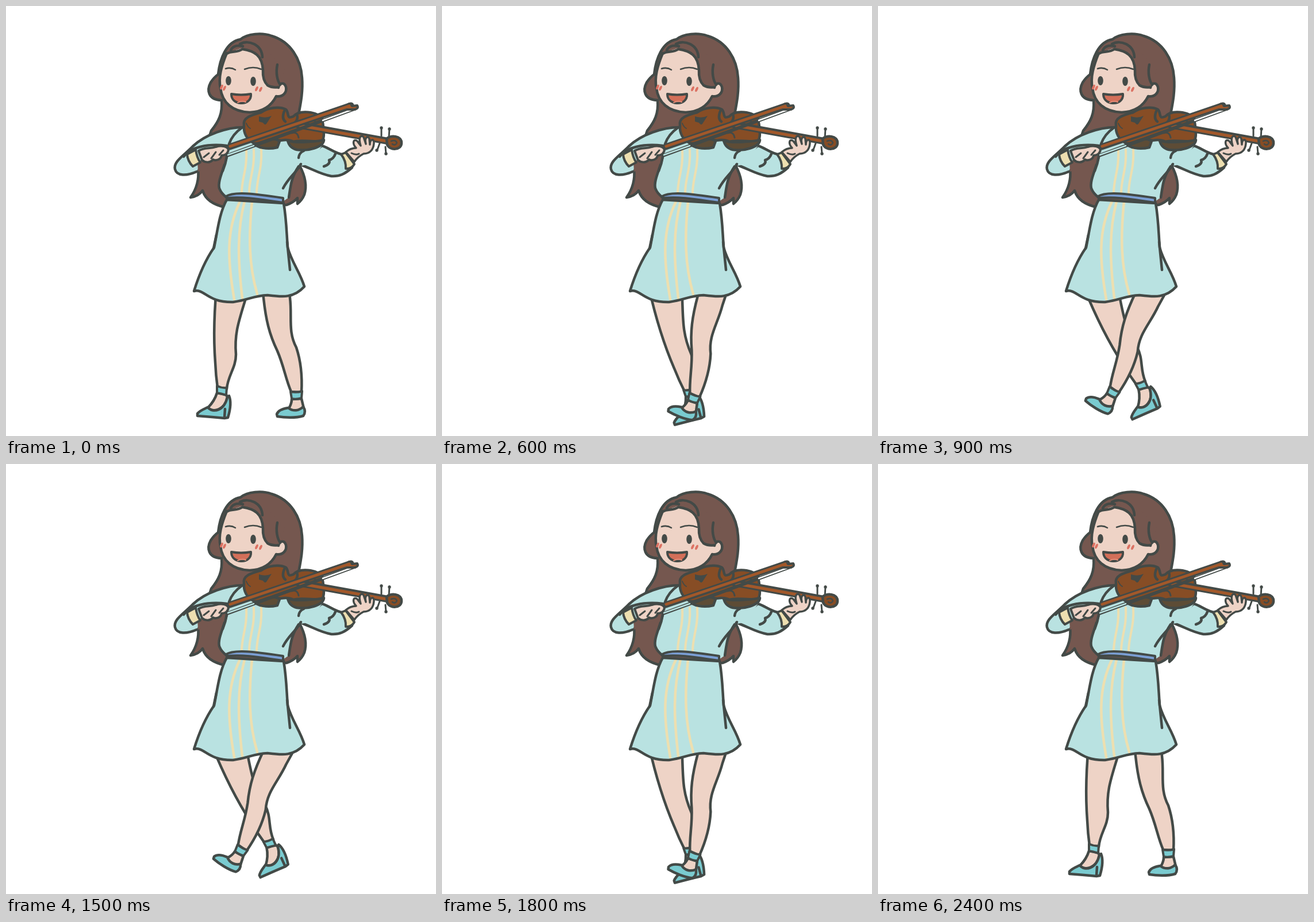
Recreate the animation shown at these times as an HTML page with a canvas. Size 748 by 748 pixels, loop 2.7 s.

```html
<!DOCTYPE html>
<html lang="en">
<head>
<meta charset="utf-8">
<title>Violinist</title>
<style>
html, body { margin: 0; width: 100%; height: 100%; overflow: hidden; background: #fff; }
canvas { display: block; width: 748px; height: 748px; }
</style>
</head>
<body>
<canvas id="stage" width="748" height="748"></canvas>
<script>
const ctx = document.getElementById('stage').getContext('2d');
const INK = '#434a47', HAIR = '#75574f', SKIN = '#eed3c6', DRESS = '#b9e2e1',
  CREAM = '#eddfb0', BELT = '#7b9fd4', TEAL = '#7acbd0', WOOD = '#874d25',
  BOW = '#a2582a', SHADE = '#5d4c36', MOUTH = '#d36f59', BLUSH = '#dc7263';

const STEP = 300, LOOP = 2700;
const ANKLES = {
  left: [[376, 668], [401, 677], [431, 672], [459, 659], [487, 645]],
  right: [[504, 676], [473, 688], [437, 681], [408, 671], [379, 652]]
};

ctx.lineCap = ctx.lineJoin = 'round';

function fill(d, color) {
  ctx.fillStyle = color;
  ctx.fill(new Path2D(d));
}

function line(d, width = 4.5, color = INK) {
  ctx.lineWidth = width;
  ctx.strokeStyle = color;
  ctx.stroke(new Path2D(d));
}

function shape(d, color, width) {
  fill(d, color);
  line(d, width);
}

function dot(x, y, rx, ry, color = INK, tilt = 0) {
  ctx.fillStyle = color;
  ctx.beginPath();
  ctx.ellipse(x, y, rx, ry, tilt, 0, Math.PI * 2);
  ctx.fill();
}

// Legs are drawn around the ankle and swing as one piece.
function limb([x, y], degrees, draw) {
  ctx.save();
  ctx.translate(x, y);
  ctx.rotate(degrees * Math.PI / 180);
  draw();
  ctx.restore();
}

function leftLeg() {
  shape('M-8-195C-13-150-16-100-12-48Q-11-25-8-4L8-2C10-26 24-38 24-62C21-98 29-120 40-156L52-195', SKIN);
  shape('M-9 5C-12 15-18 24-25 31C-14 40 4 34 10 14L7 8Z', SKIN);
  shape('M-43 41C-38 35-31 33-25 30C-16 41 4 36 9 12L12 10C17 22 13 38 10 48L4 49Q-16 47-43 45Z', TEAL);
  line('M4 48L5 33');
  shape('M-9-7Q0-3 8-4L7 9Q-2 6-9 5Z', TEAL, 4);
}

function rightLeg() {
  shape('M-59-190L-56-168C-52-130-46-105-32-76C-20-48-18-28-8-5L10-4C12-40 7-64 1-82C-14-110-6-135-10-168L-11-190', SKIN);
  shape('M-7 8C-7 16-10 20-12 24C-5 32 10 32 14 24L10 7Z', SKIN);
  shape('M-33 34C-30 26-20 24-13 23C-4 30 6 28 13 21C17 27 17 32 13 37C0 41-20 40-32 38Z', TEAL);
  shape('M-9-5Q2-3 11-6L10 6Q0 9-7 7Z', TEAL, 4);
}

function backHair() {
  shape('M408 58C420 48 445 46 462 52C495 62 513 92 515 125C517 150 512 172 509 188' +
    'L511 278C520 295 524 312 519 328Q515 338 507 344L507 334Q500 342 488 346L380 350' +
    'C360 345 347 337 342 321Q335 331 321 333C332 318 336 300 334 285L357 217' +
    'C370 201 377 187 375 164C351 163 349 146 356 133Q362 124 369 119C372 92 383 62 408 58Z', HAIR);
}

function torso() {
  fill('M412 211L388 240L384 265C377 288 368 304 372 318L383 332L482 340L492 333C495 310 500 292 512 276L545 240L500 225Z', DRESS);
  for (const x of [418, 431, 444])
    line(`M${x} 250C${x + 2} 283 ${x - 8} 300 ${x - 8} 325`, 4, CREAM);
  line('M384 262C378 287 368 304 371 317Q375 327 383 332');
  line('M492 333C495 314 496 298 509 279');
  shape('M549 243C562 246 571 257 589 259L602 281C590 292 580 297 566 296C547 293 530 282 512 276Z', DRESS);
  fill('M500 245L550 242L530 275L512 278Z', DRESS);
  line('M513 275C504 291 492 298 482 317');
  line('M518 252Q510 255 509 264');
  line('M553 279Q565 275 562 268Q570 266 573 257');
  shape('M583 258L591 255L606 275Q601 284 591 283Q592 270 583 258Z', CREAM, 4);
}

function skirt() {
  const d = 'M384 337C371 360 368 391 362 420C346 443 335 470 327 496C345 491 350 516 395 515' +
    'C423 511 430 504 455 503C480 506 500 509 519 488C512 464 497 446 490 420C488 395 488 372 483 343Z';
  fill(d, DRESS);
  line('M407 340C383 390 385 440 397 510', 4.5, CREAM);
  line('M415 340C402 390 403 440 411 508', 4.5, CREAM);
  line('M428 340C422 400 422 450 437 501', 4.5, CREAM);
  line(d);
  line('M366 398L361 422');
  line('M489 410L494 459');
  shape('M382 332C395 322 430 326 482 334L482 342C450 338 420 331 384 334Z', BELT, 4);
}

function face() {
  fill('M384 82C375 104 369 124 373 143C376 168 394 184 424 185C449 184 463 171 470 158C482 159 489 150 487 141C484 131 475 134 474 141L455 137L445 90L411 73Z', SKIN);
  line('M384 82C375 104 369 124 373 143C376 168 394 184 424 185C449 184 463 171 470 157C482 159 489 150 487 141C484 131 475 134 474 142');
  fill('M411 75C432 78 445 90 447 112Q446 129 455 138Q464 143 474 141L485 110L440 62Z', HAIR);
  line('M384 83C392 77 402 82 411 75C432 78 446 86 447 112Q446 129 455 138Q464 143 474 141');
  line('M472 102C469 117 472 130 477 137');
  line('M391 77C395 68 406 68 412 70');
  line('M407 66C422 58 445 67 446 89');
  line('M382 109Q391 106 399 111', 2.5);
  line('M415 110Q430 104 444 110', 2.5);
  dot(387, 130, 4.8, 8);
  dot(430, 131, 4.8, 8);
  for (const [x, y] of [[375, 141], [380, 143], [436, 144], [443, 145]])
    dot(x, y, 2.1, 4.6, BLUSH, .45);
  shape('M392 153Q409 156 426 153C427 164 418 170 408 169C398 168 392 162 392 153Z', MOUTH, 4);
  line('M403 168Q410 164 417 167', 2, '#e58c77');
}

function violin() {
  shape('M430 238C445 229 466 228 476 235L472 246C455 250 436 247 430 238Z', SHADE);
  shape('M490 234C510 240 535 235 553 233C552 246 524 253 506 250Q493 247 490 234Z', SHADE);
  shape('M414 208C411 193 430 189 444 185C455 177 475 174 487 180C493 186 487 198 500 192' +
    'C510 180 541 183 550 196C552 210 555 224 551 233C536 239 515 231 500 236' +
    'C486 229 476 237 470 232C455 229 446 240 432 239C418 232 413 220 414 208Z', WOOD);
  fill('M440 192Q452 196 462 191L453 205Q450 208 447 203L440 201Z', INK);
  line('M418 204Q420 210 425 213', 2);
  line('M484 183Q479 196 486 201');
  line('M506 188Q509 198 502 203');
  line('M497 221Q507 218 509 229', 3);
  line('M528 196Q537 197 539 203', 3);
  line('M509 207L664 235', 12);
  line('M511 208L662 235', 5, BOW);
  line('M653 212L653 226M667 213L666 230M646 250L650 239M661 257L660 245', 3);
  for (const [x, y] of [[653, 212], [667, 214], [645, 251], [661, 257]]) dot(x, y, 2.7, 2.7);
  shape('M662 231C668 224 689 225 688 239C687 251 668 252 663 241Z', WOOD);
  line('M670 235Q678 232 680 238Q677 244 672 240', 2.5);
}

function bow() {
  line('M385 260L606 179', 6);
  line('M386 259L431 243', 2.5, DRESS);
  line('M551 199L603 180', 2.5, '#fff');
  line('M389 245L600 173', 11);
  shape('M586 176L597 170L602 174L611 173Q614 178 607 180L591 180Z', BOW, 4);
  line('M390 244L597 174', 5, BOW);
}

function bowArm() {
  fill('M412 211C385 211 347 223 325 244C306 263 291 271 294 284C297 296 314 296 332 288L338 273L384 265L392 240Z', DRESS);
  line('M412 211C385 211 347 223 325 244C306 263 291 271 294 284C297 296 314 296 332 288');
  line('M410 212Q394 223 388 240');
  line('M309 262C320 246 350 239 384 243');
  fill('M333 270L384 258L380 274L334 288Z', HAIR);
  line('M384 262Q382 275 377 287');
  shape('M315 258L330 250Q332 264 338 272L325 279Q316 270 315 258Z', CREAM, 4);
}

function bowHand() {
  shape('M335 252C345 245 355 249 365 245C375 242 385 244 387 250C386 257 381 260 375 260C374 267 365 270 360 267C355 274 345 272 341 268Z', SKIN, 4);
  line('M344 263L353 256M357 265L365 254M371 259L378 251', 3);
}

function neckHand() {
  shape('M591 254C597 249 603 247 609 247C601 238 605 230 611 235L617 243C612 228 618 223 622 228' +
    'L626 240C623 228 630 225 632 231L633 241C633 230 641 231 640 239C639 250 633 257 622 257Q612 262 606 271Z', SKIN, 3.5);
  line('M601 256Q609 260 614 257', 3);
}

function draw(k) {
  ctx.fillStyle = '#fff';
  ctx.fillRect(0, 0, 748, 748);
  limb(ANKLES.left[k], -9.5 * k, leftLeg);
  limb(ANKLES.right[k], 10.5 * k, rightLeg);
  backHair();
  torso();
  skirt();
  bowArm();
  face();
  violin();
  bow();
  bowHand();
  neckHand();
}

// The stride swings out over five poses and back again.
function tick() {
  const step = Math.floor(performance.now() % LOOP / STEP);
  draw(4 - Math.abs(4 - step));
  requestAnimationFrame(tick);
}
tick();
</script>
</body>
</html>
```
